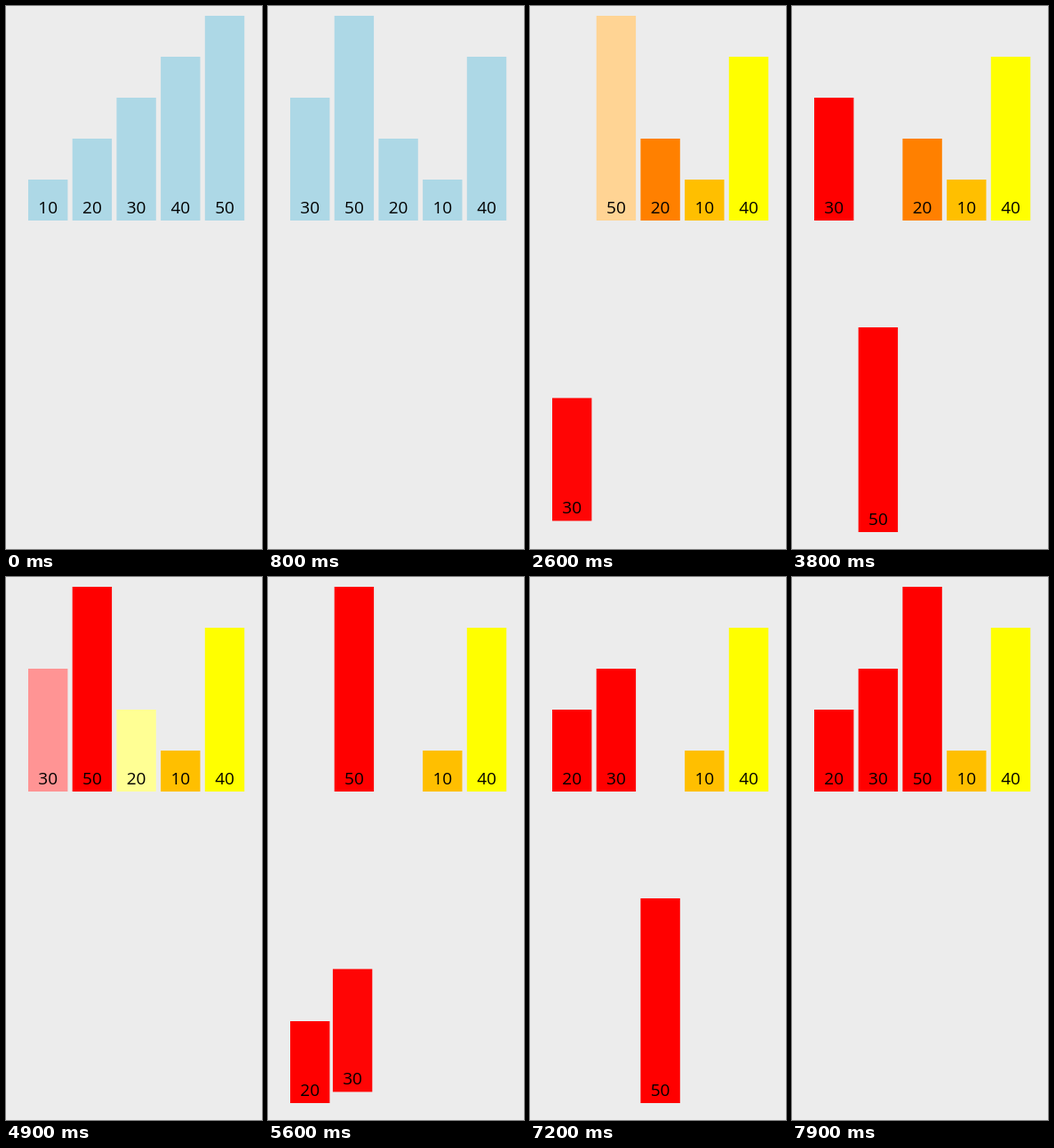
An HTML page for the animation above (8 s loop, 288x610 px).

```html
<!DOCTYPE html>
<html lang="en">
<head>
<meta charset="utf-8">
<title>Merge sort</title>
<style>
html, body { margin: 0; width: 100%; height: 100%; overflow: hidden; background: #ececec; }
svg { display: block; }
text { font: 19px "Open Sans", "Noto Sans", sans-serif; text-anchor: middle; }
</style>
</head>
<body>
<svg id="stage" width="288" height="610" viewBox="0 0 288 610"></svg>
<script>
const LOOP = 8000, FIRST = 403, STEP = 500, MOVE = 250;
const LEFT = 25, PITCH = 49.7, WIDTH = 44.4, BASE = 241, UNIT = 4.6, DROP = 350;

const BLUE = [173, 216, 230], RED = [255, 0, 0];
const warm = i => [255, Math.round(i * 63.75), 0];
const light = c => c.map(v => Math.min(255, v + 148));

// Each bar lists its changes as [step, {slot, drop, fill}].
const fall = (step, slot) => [step, { slot, drop: 1, fill: RED }];
const rise = step => [step, { drop: 0 }];
const glow = (step, i) => [step, { fill: light(warm(i)) }];
const enter = i => [[0, { slot: i }], [2, { fill: warm(i) }]];

const plan = {
  10: enter(3),
  20: [...enter(2), glow(8, 2), fall(9, 0), rise(12)],
  30: [...enter(0), glow(3, 0), fall(4, 0), rise(6), glow(8, 0), fall(10, 1), rise(13)],
  40: enter(4),
  50: [...enter(1), glow(3, 1), fall(5, 1), rise(7), fall(11, 2), rise(14)]
};

const stage = document.getElementById("stage");
function add(parent, name, attrs) {
  const el = document.createElementNS("http://www.w3.org/2000/svg", name);
  for (const key in attrs) el.setAttribute(key, attrs[key]);
  return parent.appendChild(el);
}

const bars = Object.keys(plan).map((value, i) => {
  const group = add(stage, "g", {});
  const height = value * UNIT;
  const rect = add(group, "rect", { y: BASE - height, width: WIDTH, height });
  add(group, "text", { x: WIDTH / 2, y: 233 }).textContent = value;
  return { group, rect, start: { slot: i, drop: 0, fill: BLUE }, changes: plan[value] };
});

const ease = t => t < 0.5 ? 4 * t ** 3 : 1 - 4 * (1 - t) ** 3;
const mix = (a, b, p) => Array.isArray(a) ? a.map((v, i) => mix(v, b[i], p)) : a + (b - a) * p;

function poseAt(bar, time) {
  const pose = { ...bar.start };
  for (const [step, goal] of bar.changes) {
    const t = (time - FIRST - step * STEP) / MOVE;
    if (t <= 0) break;
    const p = ease(Math.min(t, 1));
    for (const key in goal) pose[key] = mix(pose[key], goal[key], p);
  }
  return pose;
}

const begin = performance.now();
function draw() {
  const time = (performance.now() - begin) % LOOP;
  for (const bar of bars) {
    const { slot, drop, fill } = poseAt(bar, time);
    bar.group.setAttribute("transform", `translate(${LEFT + slot * PITCH} ${drop * DROP})`);
    bar.rect.setAttribute("fill", `rgb(${fill.map(Math.round)})`);
  }
  requestAnimationFrame(draw);
}
draw();
</script>
</body>
</html>
```
